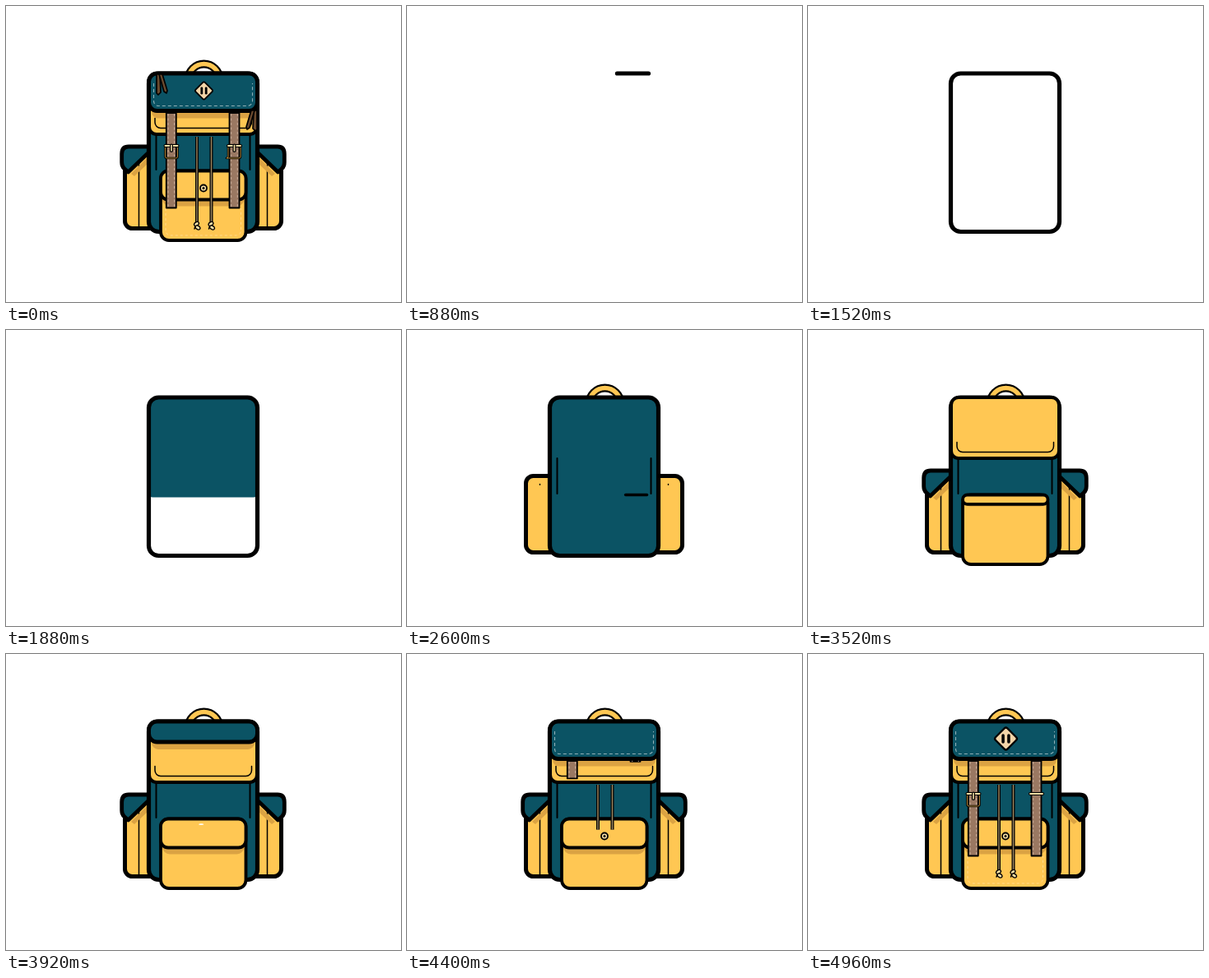
Write an HTML page with a canvas that moves like this. It is 480 by 360 pixels and loops after 5000 ms.

```html
<!DOCTYPE html>
<html>
<head>
<meta charset="utf-8">
<style>
html, body { margin: 0; width: 100%; height: 100%; overflow: hidden; background: #fff; }
canvas { display: block; }
</style>
</head>
<body>
<canvas id="stage" width="480" height="360"></canvas>
<script>
const ctx = document.getElementById('stage').getContext('2d');
const LOOP = 5000, FADE_END = 400, MID = 239.5;
const TEAL = '#0b5364', YELLOW = '#ffc753', SHADE = '#dba343';
const BROWN = '#9a7862', CREAM = '#f6dfa5', PEACH = '#f3d5a8', BLACK = '#000';

const progress = (t, start, length) => Math.max(0, Math.min(1, (t - start) / length));
const smooth = p => p * p * (3 - 2 * p);
const ease = (t, start, length) => smooth(progress(t, start, length));

// Eased growth that overshoots its final size before settling.
function spring(t, start, length, bounce = 0.55) {
  const p = ease(t, start, length);
  return p + bounce * Math.sin(Math.PI * p) * p;
}

function stroke(path, color, width) {
  ctx.strokeStyle = color;
  ctx.lineWidth = width;
  ctx.stroke(path);
}

function shape(path, fill, width) {
  ctx.fillStyle = fill;
  ctx.fill(path);
  if (width) stroke(path, BLACK, width);
}

function rounded(x, y, w, h, r) {
  const path = new Path2D();
  path.roundRect(x, y, w, h, Math.max(0, Math.min(r, h / 2)));
  return path;
}

function line(x1, y1, x2, y2, color = BLACK, width = 2) {
  const path = new Path2D();
  path.moveTo(x1, y1);
  path.lineTo(x2, y2);
  stroke(path, color, width);
}

// Open U shape with rounded lower corners.
function trough(left, right, top, bottom, r) {
  const path = new Path2D();
  path.moveTo(left, top);
  path.arcTo(left, bottom, MID, bottom, r);
  path.arcTo(right, bottom, right, top, r);
  path.lineTo(right, top);
  return path;
}

function dashed(path, pattern, color, width) {
  ctx.save();
  ctx.lineCap = 'butt';
  ctx.setLineDash(pattern);
  stroke(path, color, width);
  ctx.restore();
}

function mirrored(draw) {
  draw();
  ctx.save();
  ctx.translate(MID * 2, 0);
  ctx.scale(-1, 1);
  draw();
  ctx.restore();
}

function handle(t) {
  const rise = spring(t, 2080, 400, 0.9);
  if (!rise) return;
  const arc = new Path2D();
  arc.arc(240.5, 89.5 + 24 * (1 - rise), 19, Math.PI, 2 * Math.PI);
  stroke(arc, BLACK, 10);
  stroke(arc, YELLOW, 5.5);
}

function sidePocket(t) {
  const out = spring(t, 2080, 420, 0.85);
  if (!out) return;
  ctx.save();
  ctx.translate(35 * (1 - out), 0);
  shape(rounded(144.5, 177.5, 45, 93, 9), YELLOW, 5);
  const seam = ease(t, 2580, 340);
  if (seam) line(161.5, 187.5, 161.5, 187.5 + 81 * seam, BLACK, 1.5);
  ctx.restore();

  const cover = spring(t, 2660, 400, 0.85);
  if (!cover) return;
  ctx.save();
  ctx.translate(37 * (1 - cover), 0);
  shape(new Path2D('M152 204L173 183V191L156 207Z'), SHADE);
  shape(new Path2D('M180 171H149Q140.7 171 140.7 180V190Q140.7 195 143.5 197.5L148.5 202L173 178.5H180Z'), TEAL, 4.8);
  ctx.restore();
}

function body(t) {
  const [left, right, top, bottom, r] = [173.5, 305.5, 82, 274.5, 12];
  const fill = ease(t, 1600, 480);
  if (fill) {
    ctx.save();
    ctx.clip(rounded(left, top, right - left, bottom - top, r));
    shape(rounded(left, top, right - left, 4 + (bottom - top - 4) * fill, 5), TEAL);
    ctx.restore();
  }
  const drawn = progress(t, 840, 660);
  if (!drawn) return;
  const path = new Path2D();
  path.moveTo(right - r, top);
  path.arcTo(left, top, left, bottom, r);
  path.arcTo(left, bottom, right, bottom, r);
  path.arcTo(right, bottom, right, top, r);
  path.arcTo(right, top, left, top, r);
  if (drawn === 1) {
    path.closePath();
    stroke(path, BLACK, 5.2);
  } else {
    const length = 2 * (right - left + bottom - top) - (8 - 2 * Math.PI) * r;
    ctx.setLineDash([length * drawn, length]);
    stroke(path, BLACK, 5.2);
    ctx.setLineDash([]);
  }
  const seam = ease(t, 2480, 120);
  if (seam) mirrored(() => line(182.5, 156, 182.5, 156 + 43 * seam));
}

function frontPocket(t) {
  const across = progress(t, 2540, 240);
  if (!across) return;
  const [left, right, top] = [188, 291.5, 200.5];
  const drop = spring(t, 2896, 440);
  if (!drop) {
    line(right, top, right - (right - left) * across, top, BLACK, 3.5);
    return;
  }
  shape(rounded(left, top, right - left, 84.5 * drop, 10), YELLOW, 3.8);
  if (t > 4400) dashed(trough(194, 285.5, 246, 279, 6), [3, 3], '#ffda8c', 1);

  const fold = spring(t, 3400, 380);
  if (!fold) return;
  const height = 35 * fold;
  shape(rounded(left + 2, top, right - left - 4, height + 8 * Math.min(1, fold), 9), SHADE);
  shape(rounded(left, top, right - left, height, 9), YELLOW, 3.8);
}

function topFlaps(t) {
  const yellow = spring(t, 3088, 440);
  const teal = spring(t, 3740, 440);
  if (yellow) {
    const height = 74 * yellow;
    shape(rounded(174, 82, 131, height, 9), YELLOW, 4);
    if (height > 35) {
      const base = 82 + height - 7.5;
      stroke(trough(181, 298.5, base - 12, base, 7), BLACK, 1.5);
    }
  }
  if (!teal) return;
  const height = 45.5 * teal;
  shape(rounded(177, 90, 125, height + 1, 8), SHADE);
  shape(rounded(173.5, 82, 132, height, 10), TEAL, 5);
  const shown = ease(t, 4060, 300);
  if (shown) {
    ctx.save();
    ctx.beginPath();
    ctx.rect(176, 84, 127 * shown, 42);
    ctx.clip();
    dashed(trough(179.5, 299.5, 94, 121.5, 6), [4, 3], '#8fb0b6', 1.1);
    ctx.restore();
  }
}

function cords(t) {
  const grow = spring(t, 4240, 380, 0.4);
  if (!grow) return;
  for (const x of [232, 249.5]) {
    const end = 159 + 104 * grow;
    ctx.lineCap = 'butt';
    line(x, 159, x, end, BLACK, 4);
    line(x, 159, x, end, '#a18a62', 1.4);
    ctx.lineCap = 'round';
    if (grow > 0.9) {
      for (const [dx, dy, tilt] of [[-0.5, 2, -0.5], [1, 6.5, 0.5]]) {
        const knot = new Path2D();
        knot.ellipse(x + dx, end + dy, 3.2, 2.2, tilt, 0, 7);
        shape(knot, CREAM, 1.4);
      }
      line(x - 2, end + 5, x - 3, end + 8, BLACK, 1.5);
    }
  }
}

function strap(t, x, start) {
  const height = 115.5 * spring(t, start, 400, 0.4);
  if (!height) return;
  const path = new Path2D();
  path.rect(x - 6, 130, 12, height);
  shape(path, BROWN, 1.8);
  for (const side of [-3.8, 3.8]) {
    const stitch = new Path2D();
    stitch.moveTo(x + side, 131);
    stitch.lineTo(x + side, 129 + height);
    dashed(stitch, [3, 2.5], '#d0b5a2', 0.9);
  }
}

function buckle(t, x, start) {
  const bar = progress(t, start, 40);
  const frame = progress(t, start + 40, 80);
  if (!bar) return;
  if (frame) {
    const sides = trough(x - 7.5, x + 7.5, 170, 170 + 15 * frame, 2);
    stroke(sides, BLACK, 2.6);
    stroke(sides, SHADE, 0.8);
  }
  line(x - 7.5 * bar, 170, x + 7.5 * bar, 170, BLACK, 4);
  line(x - 7.5 * bar, 170, x + 7.5 * bar, 170, CREAM, 1.8);
  if (frame) {
    line(x, 169.5, x, 170 + 6 * frame, BLACK, 4);
    line(x, 169.5, x, 170 + 6 * frame, CREAM, 1.6);
  }
}

function button(t) {
  const p = ease(t, 3880, 240);
  if (!p) return;
  const x = 237 + 3 * p, y = 206 + 15.5 * p;
  const disc = new Path2D();
  disc.ellipse(x, y, 3 + p, Math.max(0.8, 4 * p), 0, 0, 7);
  shape(disc, p < 0.3 ? '#fff' : CREAM, p < 0.3 ? 0 : 1.8);
  if (p > 0.6) {
    const dot = new Path2D();
    dot.arc(x, y, 1.5, 0, 7);
    shape(dot, BLACK);
  }
}

function badge(t) {
  const size = spring(t, 4703, 360, 1);
  if (!size) return;
  ctx.save();
  ctx.translate(240.5, 103);
  ctx.scale(size, size);
  ctx.save();
  ctx.rotate(Math.PI / 4);
  shape(rounded(-8, -8, 16, 16, 2), PEACH, 1.8);
  ctx.restore();
  for (const x of [-2.7, 2.7]) line(x, -3.2, x, 3.2, BLACK, 2.8);
  ctx.restore();
}

function zipPulls() {
  const blades = ['M-2 0H2L3 22L0 25L-2 23Z', 'M1 0H5L11 20L10 23L7 21Z'];
  for (const [x, y, flip] of [[185, 83, 1], [303, 127, -1]]) {
    ctx.save();
    ctx.translate(x, y);
    ctx.scale(flip, 1);
    for (const blade of blades) shape(new Path2D(blade), '#6b4a2e', 1.7);
    ctx.restore();
  }
}

function render(t) {
  const leaving = t < FADE_END;
  const time = leaving ? LOOP * 2 : t;
  ctx.fillStyle = '#fff';
  ctx.fillRect(0, 0, 480, 360);
  ctx.lineCap = ctx.lineJoin = 'round';

  handle(time);
  mirrored(() => sidePocket(time));
  body(time);
  frontPocket(time);
  topFlaps(time);
  strap(time, 200.8, 4300);
  strap(time, 277.5, 4380);
  cords(time);
  button(time);
  badge(time);
  buckle(time, 201, 4830);
  buckle(time, 277.5, 4920);

  if (leaving) {
    zipPulls();
    ctx.fillStyle = `rgba(255, 255, 255, ${t / FADE_END})`;
    ctx.fillRect(0, 0, 480, 360);
  }
}

const began = performance.now();
function tick() {
  const t = (performance.now() - began) % LOOP;
  render(Math.floor(t / 40) * 40);
  requestAnimationFrame(tick);
}
tick();
</script>
</body>
</html>
```
